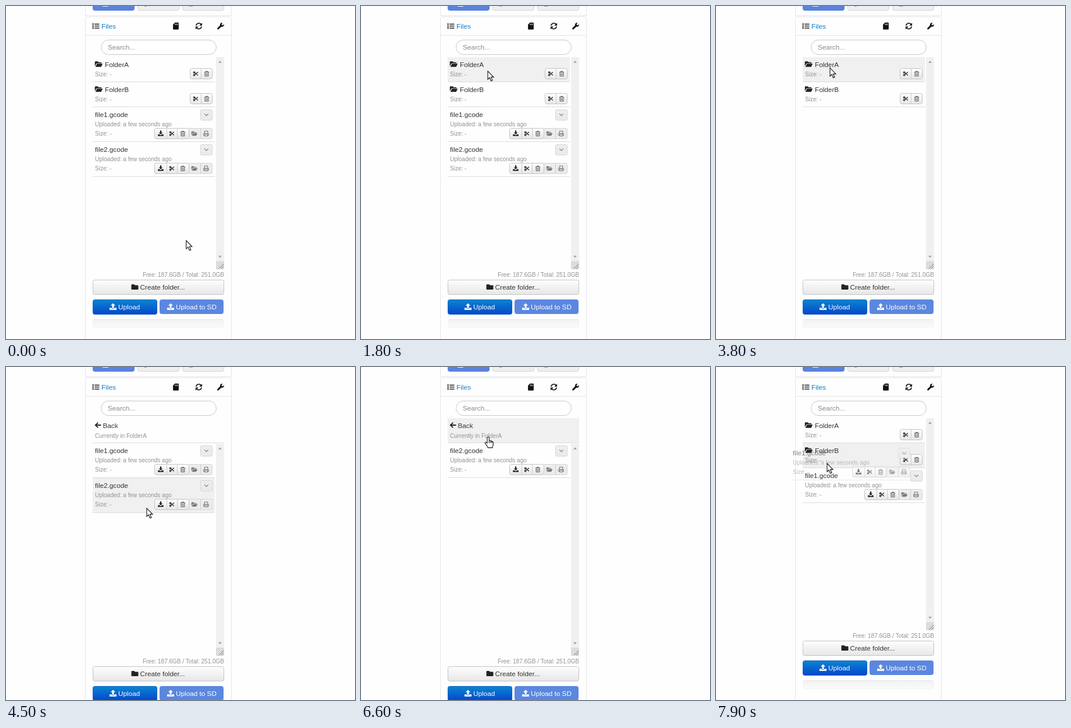
Animation of 600 by 573 pixels, one loop 8000 ms. Source, as an HTML page with a canvas:

```html
<!DOCTYPE html>
<html lang="en">
<head>
<meta charset="utf-8">
<title>File list drag and drop</title>
<style>
html, body { margin: 0; width: 100%; height: 100%; overflow: hidden; background: #fefefe; }
canvas { display: block; }
</style>
</head>
<body>
<canvas id="stage" width="600" height="573"></canvas>
<script>
const ctx = document.getElementById('stage').getContext('2d');
const LOOP = 8000;
const INK = '#333', MUTED = '#929292', LINE = '#dcdcdc', HOVER = '#f1f0f1';

// Icons on a 16 unit grid: filled path, stroked path, stroke width
const icons = {
  list: ['M0 2h3v3H0zM0 6.5h3v3H0zM0 11h3v3H0zM5 2.5h11v2H5zM5 7h11v2H5zM5 11.5h11v2H5z'],
  card: ['M6 0h7q1.5 0 1.5 1.5v13q0 1.5-1.5 1.5H3q-1.5 0-1.5-1.5V4.5zM6 2.5v3h1.3v-3zM8.6 2.5v3h1.3v-3zM11.2 2.5v3h1.3v-3z'],
  sync: ['M15.5 .5v6.5H9zM.5 15.5V9H7z', 'M1.8 7A6.2 6.2 0 0 1 13 4M14.2 9A6.2 6.2 0 0 1 3 12', 2.2],
  wrench: ['M15.7 3.7l-2.6 2.6-2.4-.6-.6-2.3L12.6.6A4.6 4.6 0 0 0 6.8 6.4L.6 12.6a2 2 0 0 0 2.8 2.8L9.6 9.2a4.6 4.6 0 0 0 6.1-5.5z'],
  open: ['M0 12V3.5q0-1.2 1.2-1.2H6l1.8 1.7h4.6q1.2 0 1.2 1.2v1H4.6q-1 0-1.5.9zM4.5 7.2H16l-2.7 5.5q-.5 1-1.5 1H1z'],
  folder: ['M1.5 2h5l2 2h6q1.5 0 1.5 1.5v7q0 1.5-1.5 1.5h-13Q0 14 0 12.5v-9Q0 2 1.5 2z'],
  download: ['M6 0h4v6h3.5L8 11.5 2.5 6H6zM0 11h4l4 3 4-3h4v5H0z'],
  upload: ['M6 12V6H2.5L8 .5 13.5 6H10v6zM0 11h5v2h6v-2h5v5H0z'],
  cut: ['', 'M1.5 4a2.2 2.2 0 1 0 4.4 0a2.2 2.2 0 1 0-4.4 0M1.5 12a2.2 2.2 0 1 0 4.4 0a2.2 2.2 0 1 0-4.4 0M5.5 5.5L15 13M5.5 10.5L15 3', 2.2],
  trash: ['', 'M1 3.5h14M5.5 3V1h5v2M3 4v11h10V4M6.3 6.5v6M9.7 6.5v6', 1.5],
  print: ['', 'M3.5 7V1h9v6M3 13H1V7.5h14V13h-2M3.5 10.5h9v4.7h-9z', 1.7],
  down: ['', 'M2 5l6 6 6-6', 1.8],
  back: ['', 'M15.5 8H2M8.5 1.8L2 8l6.5 6.2', 2.5]
};
for (const icon of Object.values(icons)) {
  icon[0] = new Path2D(icon[0]);
  icon[1] = new Path2D(icon[1] || '');
}
const arrow = new Path2D('M0 0V14.2L3.2 11.3 5.6 17 8 16 5.6 10.4H10z');
const hand = new Path2D('M-1.7 10.5V1.5a1.7 1.7 0 0 1 3.4 0V6.5c1-.8 2.4-.5 2.7.6 1-.6 2-.2 2.2.8 1.1-.4 2 .3 2 1.6v3.5c0 2-1.3 3-1.3 5.5H-.5C-.8 16.5-3 14-5 11.2c-1.1-1.6.8-3 2-1.6z');

// Pointer path: time, x, y
const path = [
  [0, 310, 404], [500, 225, 203], [550, 225, 203], [700, 216, 204], [1000, 233, 218],
  [1500, 218, 115], [1700, 218, 112], [1900, 218, 112], [2300, 203, 194], [2400, 203, 194],
  [2700, 188, 190], [2900, 192, 170], [3200, 194, 127], [3500, 196, 109], [4100, 196, 104],
  [4500, 242, 243], [4700, 242, 243], [5300, 223, 154], [5500, 223, 154], [5650, 197, 126],
  [5700, 195, 122], [6000, 202, 115], [6500, 220, 124], [6950, 214, 108], [7300, 212, 205],
  [7450, 212, 205], [7900, 191, 166], [8000, 190, 160]
];
const drags = [
  { from: 550, to: 1750, file: 1, x: 225, y: 203 },
  { from: 2350, to: 3600, file: 2, x: 203, y: 194 },
  { from: 5500, to: 6100, file: 1, x: 223, y: 154 },
  { from: 7450, to: 8000, file: 1, x: 212, y: 205 }
];
const lists = [
  [1850, [1, 2]], [3650, [2]], [4050, []], [6250, [1, 2]], [6950, [2]], [LOOP, [1]]
];

function pointer(t) {
  const i = Math.max(1, path.findIndex(p => p[0] >= t));
  const [t0, x0, y0] = path[i - 1], [t1, x1, y1] = path[i];
  const k = (t - t0) / (t1 - t0);
  return { x: x0 + (x1 - x0) * k, y: y0 + (y1 - y0) * k };
}

function rect(x, y, w, h, fill) {
  ctx.fillStyle = fill;
  ctx.fillRect(x, y, w, h);
}

function text(str, x, y, color = INK, size = 11.75, align = 'left') {
  ctx.font = `${size}px "Liberation Sans", Arial, sans-serif`;
  ctx.textAlign = align;
  ctx.fillStyle = color;
  ctx.fillText(str, x, y);
}

const small = (str, x, y, align) => text(str, x, y, MUTED, 10, align);

function icon(name, cx, cy, size, color = '#222') {
  const [fill, stroke, width] = icons[name];
  ctx.save();
  ctx.translate(cx - size / 2, cy - size / 2);
  ctx.scale(size / 16, size / 16);
  ctx.fillStyle = ctx.strokeStyle = color;
  ctx.lineWidth = width || 1;
  ctx.fill(fill, 'evenodd');
  ctx.stroke(stroke);
  ctx.restore();
}

function box(x, y, w, h, r, top, bottom, border) {
  const g = ctx.createLinearGradient(0, y, 0, y + h);
  g.addColorStop(0, top);
  g.addColorStop(1, bottom);
  ctx.beginPath();
  ctx.roundRect(x + .5, y + .5, w - 1, h - 1, r);
  ctx.fillStyle = g;
  ctx.fill();
  ctx.strokeStyle = border;
  ctx.lineWidth = 1;
  ctx.stroke();
}

const button = (x, y, w, h) => box(x, y, w, h, 3, '#fefefe', '#e6e6e6', '#c4c4c4');
const flat = (x, y, w, h) => box(x, y, w, h, 2, '#eee', '#eaeaea', '#d6d6d6');

function folderRow(name, y, hot) {
  if (hot) rect(149, y, 210, 42, HOVER);
  rect(149, y + 42, 210, 1, LINE);
  icon('open', 159.5, y + 12, 13.5);
  text(name, 170, y + 16.5);
  small('Size: -', 153, y + 32.5);
  button(316, y + 19, 39, 19);
  rect(335, y + 20, 1, 17, '#ccc');
  icon('cut', 326, y + 28.5, 9);
  icon('trash', 345, y + 28.5, 9.5, '#444');
}

function fileRow(n, y, hot) {
  if (hot) rect(149, y, 210, 59, HOVER);
  rect(149, y + 59, 210, 1, LINE);
  text(`file${n}.gcode`, 153, y + 16.5);
  small('Uploaded: a few seconds ago', 153, y + 32.5);
  small('Size: -', 153, y + 49);
  flat(334, y + 4, 21, 19);
  icon('down', 344.5, y + 13, 9, '#777');
  flat(313, y + 36, 42, 19);
  button(255, y + 36, 60, 19);
  for (const x of [276, 294, 334]) rect(x, y + 37, 1, 17, '#ccc');
  icon('download', 266, y + 45, 9.5);
  icon('cut', 285, y + 45.5, 9);
  icon('trash', 304, y + 45.5, 9.5, '#444');
  icon('open', 324, y + 45.5, 10.5, '#777');
  icon('print', 344, y + 45.5, 9.5, '#777');
}

function frameLines() {
  rect(0, 0, 600, 573, '#fefefe');
  rect(136, 0, 1, 17, '#e5e5e5');
  rect(387, 0, 1, 17, '#e5e5e5');
  rect(136, 16, 252, 1, '#e5e5e5');
  box(149, -20, 72, 28, 3, '#5b87de', '#5b82dc', '#5680d6');
  box(226, -20, 72, 28, 3, '#f3f3f3', '#eee', '#d4d4d4');
  box(303, -20, 72, 28, 3, '#f3f3f3', '#eee', '#d4d4d4');
  rect(166, 0, 10, 1, '#fff');
  rect(238, 0, 4, 1, '#999');
  rect(315, 0, 6, 1, '#999');
  box(136, 18, 252, 600, 3, '#fefefe', '#fefefe', '#e5e5e5');
  rect(136, 50, 252, 1, '#e5e5e5');
  icon('list', 154.5, 34.5, 12);
  text('Files', 164, 38.5, '#0f7fcb');
  icon('card', 292, 34.5, 12, '#111');
  icon('sync', 331.5, 34.5, 12, '#111');
  icon('wrench', 369, 34.5, 12, '#111');
  box(163, 58, 199, 26, 12.5, '#fff', '#fff', '#c8c8c8');
  text('Search...', 175, 75, '#888');
}

function triangle(y, d) {
  ctx.beginPath();
  ctx.moveTo(365, y + d);
  ctx.lineTo(371, y + d);
  ctx.lineTo(368, y - d);
  ctx.fillStyle = '#a0a0a0';
  ctx.fill();
}

function lowerPart(dy) {
  ctx.save();
  ctx.translate(0, dy);
  rect(361, 88, 14, 352, '#f0f0f1');
  triangle(96, 1.7);
  triangle(431.5, -1.7);
  rect(361, 439, 14, 14, '#dcdcdc');
  ctx.beginPath();
  for (const d of [8, 4]) {
    ctx.moveTo(374 - d, 452);
    ctx.lineTo(374, 452 - d);
  }
  ctx.strokeStyle = '#777';
  ctx.stroke();
  small('Free: 187.6GB / Total: 251.0GB', 375, 466, 'right');
  button(149, 471, 226, 26);
  icon('folder', 221.5, 483.5, 12);
  text('Create folder...', 230.5, 487.5);
  box(149, 505, 111, 26, 3, '#0a86cf', '#0546cc', '#1060c0');
  icon('upload', 184, 517, 12, '#fff');
  text('Upload', 193, 521.5, '#fff');
  box(264, 505, 110, 25, 3, '#5b87de', '#5b87de', '#5b87de');
  icon('upload', 283, 517, 12, '#fff');
  text('Upload to SD', 292, 521.5, '#fff');
  box(149, 539, 226, 15, 3, '#f2f2f2', '#fafafa', '#f4f4f4');
  rect(151, 539, 222, 1, '#e6e6e6');
  ctx.restore();
}

function draw(t) {
  const inside = t >= 4050 && t < 6950;
  const files = lists.find(l => t < l[0])[1];
  const drag = drags.find(d => t >= d.from && t < d.to);
  const p = pointer(t);
  const hoverY = pointer(Math.max(0, t - 50)).y;
  const over = (y, h) => hoverY >= y && hoverY < y + h;
  const top = inside ? 131 : 174;

  frameLines();
  lowerPart(inside ? 44 : 0);
  if (inside) {
    if (over(88, 43)) rect(149, 88, 226, 42, HOVER);
    rect(149, 130, 226, 1, LINE);
    icon('back', 158, 100, 11.5);
    text('Back', 166.5, 104.5);
    small('Currently in FolderA', 153, 121.5);
  } else {
    folderRow('FolderA', 88, over(88, 43));
    folderRow('FolderB', 131, over(131, 43));
  }
  files.forEach((n, i) => {
    const y = top + i * 60;
    fileRow(n, y, !drag && over(y, 60));
  });

  if (drag) {
    ctx.save();
    ctx.globalAlpha = .6;
    ctx.translate(Math.round(p.x - drag.x), Math.round(p.y - drag.y));
    fileRow(drag.file, top);
    ctx.restore();
  }

  const shape = inside && p.y < 131 ? hand : arrow;
  ctx.save();
  ctx.translate(p.x, p.y);
  ctx.fillStyle = '#fff';
  ctx.strokeStyle = '#111';
  ctx.lineWidth = 1.1;
  ctx.fill(shape);
  ctx.stroke(shape);
  if (shape === hand) {
    ctx.beginPath();
    for (const x of [1.7, 4.4, 6.6]) {
      ctx.moveTo(x, 7);
      ctx.lineTo(x, 10.5);
    }
    ctx.stroke();
  }
  ctx.restore();
}

const start = performance.now();
function tick() {
  draw((performance.now() - start) % LOOP);
  requestAnimationFrame(tick);
}
tick();
</script>
</body>
</html>
```
